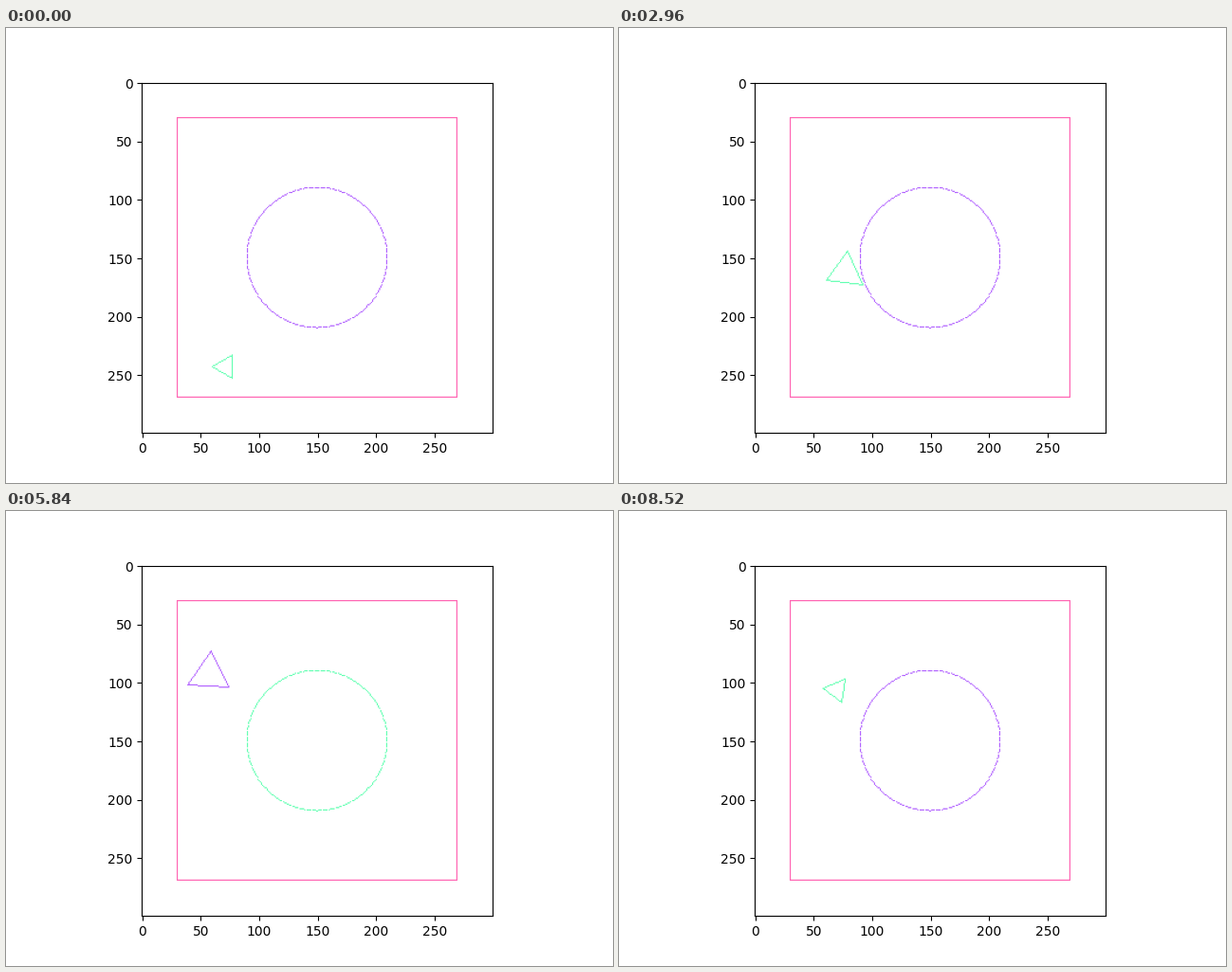
Write a matplotlib script that moves like this. It is 640 by 480 pixels and loops after 8560 ms.

```python
import numpy as np
import matplotlib.pyplot as plt
from matplotlib.animation import FuncAnimation

FRAMES, INTERVAL = 214, 40
SIZE = 300
SPEED = 3       # image pixels per frame
SPIN = -7.2     # degrees per step
CYCLE = 100     # steps to grow to double size and shrink back
PINK, PURPLE, GREEN = (255, 98, 178), (178, 98, 255), (98, 255, 178)

START, END = (71.4, 243), (69.7, 106)
# Bounce points in order: x, y and the shape touched, once per frame of contact
BOUNCES = [
    (102.5, 257.2, ["square"]),
    (44.2, 240.6, ["square"] * 2),
    (61.4, 261, ["square"]),
    (77.7, 162, ["circle"]),
    (45.5, 140.6, ["square"]),
    (94, 104.7, ["circle"] * 2),
    (82.8, 43.7, ["square"]),
    (46.3, 113.7, ["square"]),
    (84.7, 104.4, ["circle"] * 2),
    (40, 153.6, ["square"]),
    (79, 130.6, ["circle"]),
]

# Constant speed along the path gives the time of every bounce.
path = np.array([START, *[b[:2] for b in BOUNCES], END])
legs = np.hypot(*np.diff(path, axis=0).T)
times = np.append(0, np.cumsum(legs)) / SPEED
hits = [(round(t) + 1 + i, shape)
        for t, (_, _, shapes) in zip(times[1:], BOUNCES)
        for i, shape in enumerate(shapes)]


def draw_square(img, color, lo=30, hi=269):
    img[[lo, hi], lo:hi + 1] = color
    img[lo:hi + 1, [lo, hi]] = color


def draw_circle(img, color, center=150, radius=60):
    t = np.linspace(0, 2 * np.pi, 300)
    x = (center + radius * np.sin(t)).astype(int)
    y = (center + radius * np.cos(t)).astype(int)
    img[y, x] = color


def draw_line(img, a, b, color):
    n = int(np.abs(b - a).max())
    x, y = np.rint(np.linspace(a, b, n + 1)).astype(int).T
    img[y, x] = color


def draw_triangle(img, color, center, step):
    phase = step % CYCLE
    scale = 1 + 2 * min(phase, CYCLE - phase) / CYCLE
    radius = 20 / np.sqrt(3) * scale
    ang = np.radians(60 + SPIN * step + np.array([0, 120, 240]))
    pts = np.rint(center + radius * np.column_stack([np.cos(ang), np.sin(ang)]))
    for a, b in zip(pts, np.roll(pts, -1, axis=0)):
        draw_line(img, a, b, color)


def render(frame):
    colors = {"square": PINK, "circle": PURPLE, "triangle": GREEN}
    step = frame
    for hit, shape in hits:
        if hit <= frame:
            # Contact swaps colours and holds spin and growth for one frame.
            colors[shape], colors["triangle"] = colors["triangle"], colors[shape]
            step -= 1
    center = np.array([np.interp(frame, times, axis) for axis in path.T])

    img = np.full((SIZE, SIZE, 3), 255, np.uint8)
    draw_square(img, colors["square"])
    draw_circle(img, colors["circle"])
    draw_triangle(img, colors["triangle"], center, step)
    return img


fig, ax = plt.subplots(figsize=(6.4, 4.8), dpi=100)
picture = ax.imshow(render(0))


def update(frame):
    picture.set_data(render(frame))
    return [picture]


anim = FuncAnimation(fig, update, frames=FRAMES, interval=INTERVAL,
                     repeat=True, repeat_delay=0)
plt.show()
```
